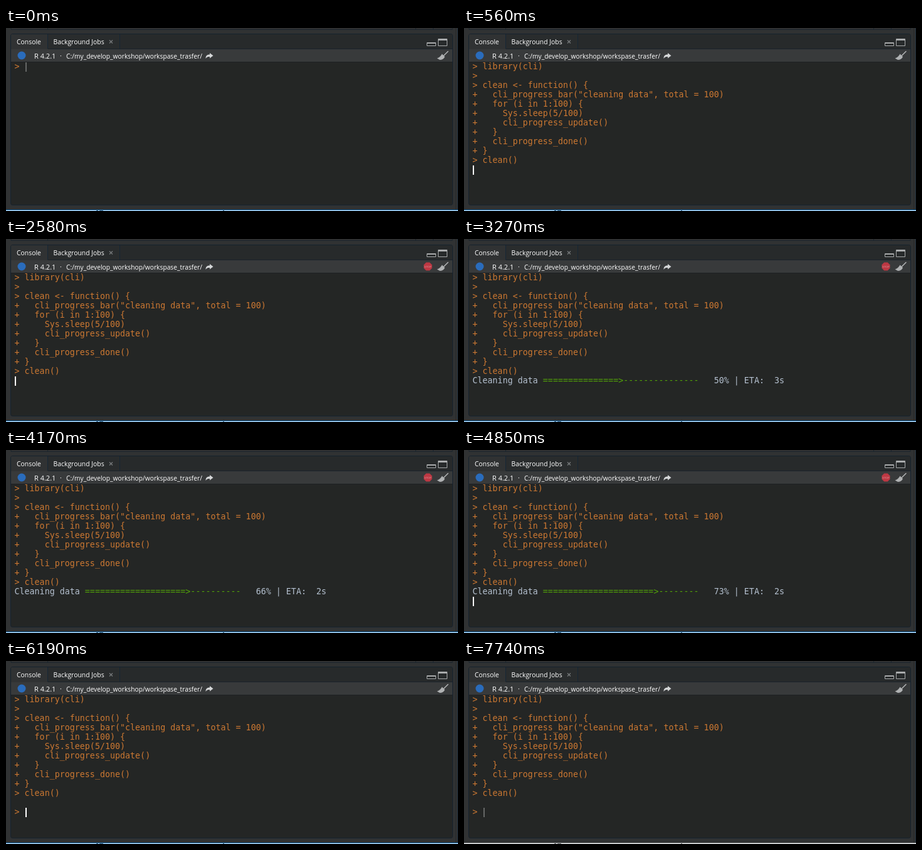
Recreate the animation shown at these times as an HTML page. Size 721 by 293 pixels, loop 7760 ms.

```html
<!DOCTYPE html>
<html lang="en">
<head>
<meta charset="utf-8">
<title>Progress bar in a console</title>
<style>
  html, body { margin: 0; width: 100%; height: 100%; overflow: hidden; background: #303233; }
  svg { display: block; }
  text { white-space: pre; }
  .ui { font: 500 10.4px "Open Sans", "Noto Sans", sans-serif; fill: #fff; }
  .mono { font: 13.33px "DejaVu Sans Mono", monospace; fill: #cc7832; }
  #progress { fill: #b4c0cf; }
  .bar { fill: #52a208; }
</style>
</head>
<body>
<svg width="721" height="293" viewBox="0 0 721 293">
  <!-- window edges -->
  <rect width="721" height="293" fill="#303233"/>
  <path d="M8 0V2.5H712V0M66.5 0V2M653.5 0V2M681.5 0V2" fill="none" stroke="#1a242d"/>
  <path d="M720.5 0V291" stroke="#1c2a38"/>
  <path d="M717.5 0V291" stroke="#28292a"/>
  <rect id="edge" y="291" width="721" height="1"/>
  <rect y="292" width="721" height="1" fill="#e6e9eb"/>
  <path d="M144 292.5H147M149 292.5H155M346 292.5H348" stroke="#55585a"/>

  <!-- panel -->
  <rect x="7.5" y="9.5" width="705" height="274" rx="3" fill="#242625" stroke="#15222e"/>
  <path d="M8 34V12Q8 10 10 10H710Q712 10 712 12V34Z" fill="#272a2b"/>
  <path d="M8 34V12Q8 10 10 10H66V34Z" fill="#303233"/>
  <rect x="67" y="10" width="114" height="23" fill="#292c2d"/>
  <path d="M66.5 10V33M181.5 10V33" stroke="#172635"/>
  <path d="M67 33.5H712" stroke="#1a222a"/>
  <rect x="8" y="34" width="704" height="20" fill="#383a3b"/>
  <path d="M8 54.5H712" stroke="#1d2023"/>

  <!-- tabs and toolbar -->
  <g class="ui">
    <text x="17" y="26">Console</text>
    <text x="75.5" y="26">Background Jobs</text>
    <text x="45" y="48.5" style="font-size:11px">R 4.2.1</text>
    <text x="86" y="48">·</text>
    <text x="96" y="48.5" style="font-size:10.25px">C:/my_develop_workshop/workspase_trasfer/</text>
  </g>
  <path d="M165 19.5L170 24.5M170 19.5L165 24.5" stroke="#777a7c" stroke-width="1.3"/>
  <circle cx="25" cy="44" r="6.5" fill="#2a6cbc"/>
  <path d="M318.5 49C318.5 44 321 42.5 325 42.5V40L330.5 44.2L325 48.5V46C322 46 320 46.5 318.5 49Z" fill="#d5d7d8"/>
  <g fill="none" stroke="#a9abac">
    <path d="M671.5 23.5H685.5V28.5H671.5ZM672 24.5H685"/>
    <path d="M689.5 17.5H703.5V28.5H689.5ZM690 18.5H703M690 19.5H703"/>
  </g>
  <path d="M705 37.5L698 44.5" stroke="#b0b2b3" stroke-width="1.6" stroke-linecap="round"/>
  <path d="M695.5 41.5L700 46C698.5 49.5 696 51 692 51L687.5 48.5C691 47.5 693.5 45 695.5 41.5Z" fill="#b0b2b3"/>
  <g id="stop">
    <path d="M670.2 37.5H675.8L679.5 41.2V46.8L675.8 50.5H670.2L666.5 46.8V41.2Z" fill="#bd3843"/>
    <text x="673" y="45.5" text-anchor="middle" fill="#dc959b" style="font:4.4px 'Liberation Sans',sans-serif">STOP</text>
  </g>

  <!-- console -->
  <g id="code" class="mono"></g>
  <text id="progress" class="mono" x="13.5" y="231"></text>
  <text id="prompt" class="mono" x="13.5">&gt;</text>
  <rect id="cursor" width="2" height="15" fill="#fff"/>
</svg>
<script>
const LOOP = 7760, RUN = 560, FIRST = 2700, END = 6190, BLUR = 7740;
const $ = id => document.getElementById(id);
const code = `> library(cli)
>
> clean <- function() {
+   cli_progress_bar("cleaning data", total = 100)
+   for (i in 1:100) {
+     Sys.sleep(5/100)
+     cli_progress_update()
+   }
+   cli_progress_done()
+ }
> clean()`;
const baseline = row => 66 + 15 * row;

code.split("\n").forEach((line, row) => {
  const el = document.createElementNS("http://www.w3.org/2000/svg", "text");
  el.setAttribute("x", 13.5);
  el.setAttribute("y", baseline(row));
  el.textContent = line;
  $("code").append(el);
});

// the cursor flips between off and on at each of these times
const blinks = [280, 1230, 1630, 2180, 2580, 3130, 3520, 4050, 4460, 5090, 5480, 6040, 6190, 6740, 7190, 7740];
// [time, percent]
const updates = [[2700, 40], [2860, 44], [3010, 47], [3270, 50], [3390, 53], [3660, 56], [3780, 60],
  [4050, 63], [4170, 66], [4580, 70], [4850, 73], [4970, 76], [5220, 80], [5360, 83], [5480, 86],
  [5640, 90], [5780, 93], [6040, 97]];

function barLine(percent) {
  const full = Math.floor(31 * percent / 100);
  const eta = Math.round((100 - percent) * .056);
  return `Cleaning data <tspan class="bar">${"=".repeat(full)}&gt;${"-".repeat(30 - full)}</tspan>` +
    `   ${percent}% | ETA:  ${eta}s`;
}

let shown = 0;
function draw(t) {
  const running = t >= RUN && t < END;
  const percent = running ? updates.filter(u => u[0] <= t).pop()?.[1] ?? 0 : 0;
  if (percent !== shown) $("progress").innerHTML = percent ? barLine(percent) : "";
  shown = percent;

  $("code").style.display = t < RUN ? "none" : "";
  $("prompt").style.display = running ? "none" : "";
  $("stop").style.opacity = !running || t < 1470 ? 0 : t < 1630 ? .7 : 1;
  $("edge").style.fill = t < BLUR ? "#1883d7" : "#a4a6a8";

  const row = t < RUN ? 0 : t < FIRST ? 11 : 12;
  const on = blinks.filter(b => b <= t).length % 2;
  $("prompt").setAttribute("y", baseline(row));
  $("cursor").setAttribute("x", running ? 14 : 31);
  $("cursor").setAttribute("y", baseline(row) - 11);
  $("cursor").style.opacity = on ? 1 : running ? 0 : .3;
}

const start = performance.now();
function frame() {
  draw((performance.now() - start) % LOOP);
  requestAnimationFrame(frame);
}
frame();
</script>
</body>
</html>
```
